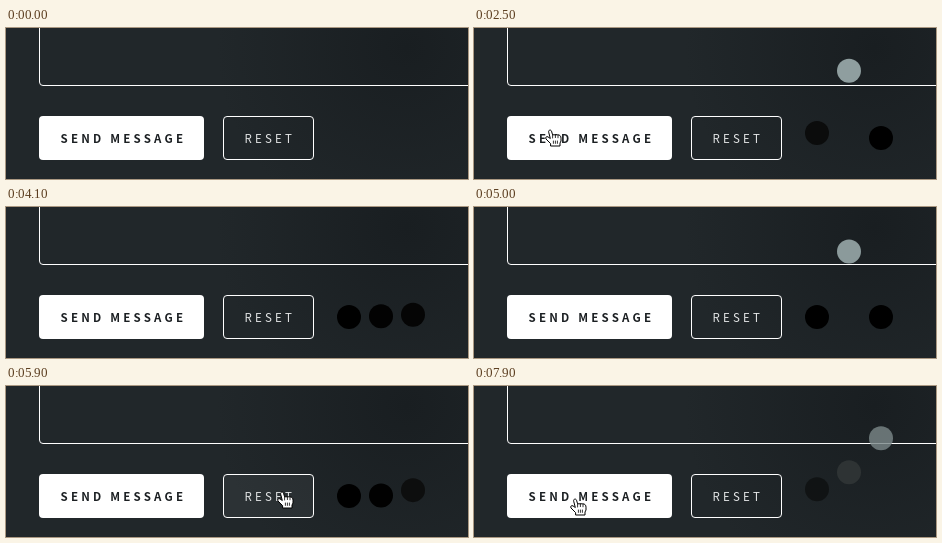
These frames come from a looping animation (462 by 151 pixels, 8 s). An HTML page:

```html
<!DOCTYPE html>
<html lang="en">
<head>
<meta charset="utf-8">
<title>Contact form loader</title>
<style>
  html, body { margin: 0; width: 100%; height: 100%; overflow: hidden; background: #21272a; }
  svg { display: block; width: 100vw; height: 100vh; }
  text { font: 600 11.5px "Noto Sans CJK JP", "Noto Sans CJK SC", "Noto Sans CJK", "Open Sans", sans-serif; letter-spacing: 3.2px; }
</style>
</head>
<body>
<svg viewBox="0 0 462 151">
  <defs>
    <radialGradient id="shade" gradientUnits="userSpaceOnUse" cx="400" cy="20" r="190">
      <stop stop-color="#191e21"/>
      <stop offset="1" stop-color="#191e21" stop-opacity="0"/>
    </radialGradient>
  </defs>
  <rect width="462" height="151" fill="#21272a"/>
  <rect width="462" height="151" fill="url(#shade)"/>

  <rect x="33.5" y="-20.5" width="480" height="78" rx="3.5" fill="none" stroke="#fff"/>
  <rect x="33" y="88" width="165" height="44" rx="4" fill="#fff"/>
  <text x="54.6" y="115" fill="#1b1f22">SEND MESSAGE</text>
  <rect id="reset" x="217.5" y="88.5" width="90" height="43" rx="3.5" fill="#fff" fill-opacity="0" stroke="#fff"/>
  <text x="238.6" y="115" fill="#e4e6e7" style="font-weight:300">RESET</text>

  <g id="dots">
    <circle cx="343" r="12"/>
    <circle cx="375" r="12"/>
    <circle cx="407" r="12"/>
  </g>
  <g id="hand" stroke="#000" stroke-linejoin="round" stroke-linecap="round">
    <path fill="#fff" d="M3.6 2.8C3.2.8 5.9.4 6.5 2.2L7.6 5.8H12.6C15 5.8 16 7.2 16 9.2V12L15 14V17H5.6V14.6L1 10C0 8.4 1.6 7 3 7.9L5 9.3Z"/>
    <path fill="none" stroke-width=".8" d="M7.6 6V9M10.4 6V8.6M13 6.2V8.8M8.4 12V14.4M10.4 12V14.4M12.4 12V14.4"/>
  </g>
</svg>
<script>
const LOOP = 8000, FALL = 450, HEIGHT = 70, FADE = 300;
const $ = id => document.getElementById(id);
const dots = [...$('dots').children];

const clamp = v => Math.max(0, Math.min(1, v));
const easeOut = v => 1 - (1 - v) ** 2;
const fade = (t, from, to) => clamp((t - from) / FADE) * clamp((to - t) / FADE);

// Height 0..1 of a dot that tops out at `first` and every `period` after it.
function hop(t, first, period) {
  const n = Math.max(0, Math.round((t - first) / period));
  return clamp(1 - Math.abs(t - first - n * period) / FALL) ** 3;
}

// The dots hop out of step; a new run starts them one after another.
const runs = [
  { from: 1700, to: 6500, first: [1875, 2495, 1934], period: [890, 1258, 1238] },
  { from: 7660, to: 9000, first: [0, 1, 2].map(i => 7657 + 108 * i), period: [890, 1258, 1238] }
];

// Each glide bows by `bow` px; the pointer then rests until `until`.
const glides = [
  { from: 800, to: 1150, until: 1300, a: [-2, 99], b: [69, 91], bow: -3 },
  { from: 1300, to: 1500, until: 3000, a: [69, 91], b: [71, 101], bow: 0 },
  { from: 5700, to: 5900, until: 6720, a: [270, 150], b: [271, 105], bow: 0 },
  { from: 6720, to: 7200, until: 8000, a: [271, 105], b: [96, 112], bow: 30 }
];

function drawDots(t) {
  const run = runs.find(r => t >= r.from && t < r.to);
  $('dots').setAttribute('opacity', run ? fade(t, run.from, run.to) : 0);
  if (!run) return;
  const calm = clamp((run.to - 200 - t) / FADE);
  dots.forEach((dot, i) => {
    const h = hop(t, run.first[i], run.period[i]) * calm;
    dot.setAttribute('cy', 110 - HEIGHT * h);
    dot.setAttribute('fill', `rgb(${[149, 165, 166].map(c => Math.round(c * h))})`);
  });
}

function drawHand(t) {
  const g = glides.find(k => t >= k.from && t < k.until);
  $('hand').style.display = g ? '' : 'none';
  if (!g) return;
  const f = easeOut(clamp((t - g.from) / (g.to - g.from)));
  const [x, y] = g.a.map((v, i) => v + (g.b[i] - v) * f);
  $('hand').setAttribute('transform', `translate(${x} ${y + g.bow * Math.sin(Math.PI * f)})`);
}

function draw(t) {
  drawDots(t);
  drawHand(t);
  $('reset').setAttribute('fill-opacity', .05 * fade(t, 5600, 7000));
}

const start = performance.now();
function tick() {
  draw((performance.now() - start) % LOOP);
  requestAnimationFrame(tick);
}
tick();
</script>
</body>
</html>
```
